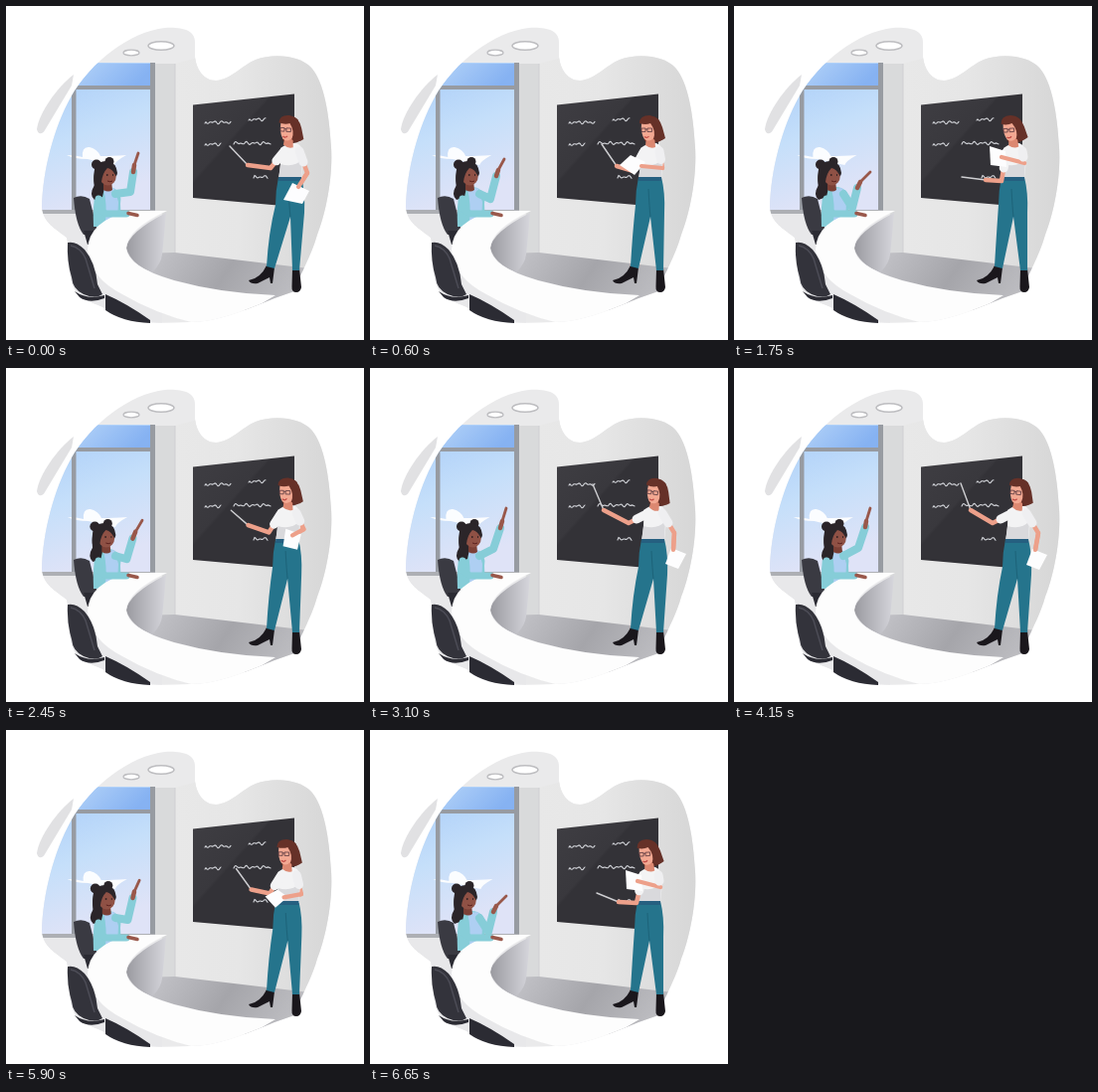
These frames come from a looping animation (360x336 px, 6.7 s). An HTML page:

```html
<!DOCTYPE html>
<html lang="en">
<head>
<meta charset="utf-8">
<title>Classroom</title>
<style>
html, body { margin: 0; width: 100%; height: 100%; overflow: hidden; background: #fff; }
svg { display: block; width: 360px; height: 336px; }
.limb { fill: none; stroke-linecap: round; stroke-linejoin: round; }
.chalk { fill: none; stroke: #d3d5da; stroke-width: 1.1; stroke-linecap: round; stroke-linejoin: round; }
</style>
</head>
<body>
<svg viewBox="0 0 360 336">
<defs>
  <linearGradient id="sky" x2=".3" y2="1"><stop stop-color="#a5caf8"/><stop offset=".55" stop-color="#c5dffa"/><stop offset="1" stop-color="#dfe3f7"/></linearGradient>
  <linearGradient id="pane" x2="1" y2=".3"><stop stop-color="#b2d2f8"/><stop offset="1" stop-color="#86b2f2"/></linearGradient>
  <linearGradient id="floor" x2="1" y2=".2"><stop stop-color="#c9c9ce"/><stop offset=".5" stop-color="#a5a5aa"/><stop offset="1" stop-color="#c4c4c8"/></linearGradient>
  <linearGradient id="wall" x2="1"><stop stop-color="#e8e8e8"/><stop offset=".4" stop-color="#e6e6e6"/><stop offset="1" stop-color="#d6d6d6"/></linearGradient>
  <linearGradient id="desk" x2="1"><stop stop-color="#9a9aa0"/><stop offset="1" stop-color="#d6d6dc"/></linearGradient>
  <linearGradient id="board" x2="1" y2="1"><stop stop-color="#3f3e43"/><stop offset=".38" stop-color="#39383d"/><stop offset=".4" stop-color="#333237"/><stop offset="1" stop-color="#333237"/></linearGradient>
  <clipPath id="clip"><path d="M190 36C190 24 176 21 160 22C124 26 86 56 65 92C48 123 37 165 36 202C37 218 50 224 61 233C65 250 61 272 70 287C79 298 94 300 103 306C127 321 156 319 184 318C216 318 244 304 270 294L290 287C296 268 307 252 313 230C321 210 329 174 327 142C325 108 320 77 307 62C296 50 270 47 251 54C237 60 226 74 211 75C199 75 191 64 190 50Z"/></clipPath>
</defs>

<path d="M68 69C51 82 33 108 31 124C32 129 36 130 39 125L66 80Z" fill="#e1e1e3"/>
<g clip-path="url(#clip)">
  <rect width="360" height="336" fill="#eaeaeb"/>
  <path d="M170 58L330 15V272L170 249Z" fill="url(#wall)"/>
  <path d="M150 58H170V249H150Z" fill="#d9dadb"/>
  <path d="M30 57H150V205H30Z" fill="url(#sky)"/>
  <path d="M70 58H145V80H70Z" fill="url(#pane)"/>
  <path id="cloud" d="M61 150Q70 150 77 152Q76 141 84 142Q92 144 95 151Q106 151 121 150Q110 156 109 160Q91 156 82 154Q69 154 61 150Z" fill="#fff" opacity=".93"/>
  <path d="M66 57H70.500V207H66ZM145 57H150V207H145ZM66 80H150V84H66Z" fill="#979ba2"/>
  <path d="M30 205H150V209H30Z" fill="#adafb4"/>
  <path d="M30 209H157V330H30Z" fill="#e8e8ea"/>
  <path d="M170 58V249" stroke="#cfcfd2"/>
  <ellipse cx="156" cy="40" rx="13" ry="4.300" fill="#fff" stroke="#bdbdc0" stroke-width="1.500"/>
  <ellipse cx="126" cy="47" rx="8" ry="2.800" fill="#fff" stroke="#bdbdc0" stroke-width="1.300"/>
  <path d="M130 249L170 248L330 267V300L180 310Z" fill="url(#floor)"/>
  <path d="M188 99.500L290 88.500V202L188 193Z" fill="url(#board)"/>
  <g id="chalk"></g>
</g>

<!-- student -->
<path d="M68 193Q76 189 84 194L91 222V230H78Q70 220 68 193Z" fill="#3a3a42"/>
<path d="M78 226H94V240H82Z" fill="#2b2b33"/>
<path d="M90 186Q99 180 108 183Q117 187 115 199L116 222H88Q87 201 90 186Z" fill="#86cdd8"/>
<path d="M98 184L109 183L113 197L112 218H100Q102 199 98 184Z" fill="#aecff2"/>
<g id="girl">
  <path d="M90 160Q87 172 89 180Q83 190 89 195L97 192L104 160Z" fill="#2b2529"/>
  <path d="M98 176H106L107 185Q103 188 98 185Z" fill="#7b4036"/>
  <ellipse cx="102.500" cy="171" rx="8.300" ry="9.500" fill="#8f5145"/>
  <circle cx="91" cy="159.500" r="5" fill="#2b2529"/>
  <circle cx="104" cy="156.500" r="4.500" fill="#2b2529"/>
  <path d="M89 167Q90 156 101 156Q111 157 112 168Q111 173 110 170Q107 164 102 163Q97 168 96 177L97 190L91 192Q87 178 89 167Z" fill="#2b2529"/>
  <path d="M101 170h1.500M107 170h1" stroke="#241a1d" stroke-width="1.500"/>
  <path d="M102 176q3 1.500 5 0" fill="none" stroke="#5c211e"/>
</g>
<path id="raise" class="limb" stroke="#86cdd8" stroke-width="8"/>
<path id="palm" class="limb" stroke="#99584b" stroke-width="4.500"/>
<path id="finger" class="limb" stroke="#99584b" stroke-width="2.800"/>

<!-- desk -->
<g clip-path="url(#clip)">
  <path d="M161 208L157 250Q156 259 147 268Q126 260 121 244Q122 228 161 208Z" fill="url(#desk)"/>
  <path d="M162 206H125Q83 216 82 245Q84 273 117 290Q151 310 190 319H225Q254 301 271 291Q216 289 169 276Q121 262 121 243Q123 224 162 206Z" fill="#fdfdfd"/>
</g>
<path class="limb" d="M93 194Q91 206 101 209L121 209" stroke="#86cdd8" stroke-width="7"/>
<path class="limb" d="M123 208.500L132 210.500" stroke="#99584b" stroke-width="3.500"/>

<!-- near chair -->
<path d="M62 238Q70 236 79 245Q90 258 92 280L97 290Q90 295 78 290Q67 285 66 273Q61 257 62 238Z" fill="#33333b"/>
<path d="M65 241Q75 243 80 254L89 284" fill="none" stroke="#4c4c56" stroke-width="1.500"/>
<path d="M69 287Q82 296 99 291V294Q84 300 74 293Z" fill="#2b2b33"/>
<path d="M100 290Q121 299 145 316V319Q117 318 100 306Z" fill="#2b2b33"/>

<!-- teacher -->
<path id="backArm" class="limb" stroke="#eda08a" stroke-width="4.500"/>
<path d="M262 261L270 263L268 279H266L265 273L253 279Q246 280 244 276Q256 274 262 261Z" fill="#1a171c"/>
<path d="M288 264H295L297 283Q296 288 292 288Q287 288 287.500 282Z" fill="#1a171c"/>
<path id="legs" fill="#25748c"/>
<path id="crease" fill="none" stroke="#1d6379" stroke-width="1"/>
<path id="torso" fill="#f3f3f4"/>
<path id="shade" fill="#d9d9dc"/>
<path id="belt" stroke="#255f80" stroke-width="4" fill="none"/>
<g id="head">
  <path d="M-6-11Q2-16 8-10Q11 0 14 8Q9 15 1 13L-6 12Z" fill="#5c2c25"/>
  <path d="M-4 7L4 6L5 18Q0 20-5 16Z" fill="#dc8871"/>
  <path d="M-9-6Q-4-12 3-8Q7 0 4 8Q-1 14-6 10Q-10 4-9-6Z" fill="#f2a892"/>
  <path d="M-11-6Q-11-14-1-14Q9-13 12-2L15 9Q9 14 3 10Q6 2 0-6Q-5-4-11-6Z" fill="#663128"/>
  <path d="M-9-1h4v3.500h-4zM-3-1h4.500v3.500h-4.500zM-5 0h2" fill="none" stroke="#5b3a40" stroke-width=".8"/>
  <path d="M-6 7.500q2.500 2 4.500-.5" fill="none" stroke="#c04a44" stroke-width="1.200"/>
</g>
<path id="stick" class="limb" stroke="#cfcfd2" stroke-width="1.400"/>
<path id="frontArm" class="limb" stroke="#eda08a" stroke-width="4.500"/>
<path id="frontSleeve" class="limb" stroke="#f3f3f4" stroke-width="9"/>
<path id="paper" fill="#fdfdfe"/>
<path id="foreArm" class="limb" stroke="#eda08a" stroke-width="4.200"/>
<path id="backSleeve" class="limb" stroke="#efeff1" stroke-width="9"/>
</svg>
<script>
const LOOP = 6700, CYCLE = 5500, STEP = 50;
const el = id => document.getElementById(id);
const set = (id, d) => el(id).setAttribute("d", d);
const mix = (a, b, k) => a + (b - a) * k;

// Every pose holds points as flat x,y pairs.
const point = {
  body: [286], head: [285, 124, 4], elbow: [266, 163], hand: [243, 160], tip: [225, 141],
  backElbow: [303, 168], backHand: [294, 182], paper: [288, 178, 305, 186, 298, 199, 279, 195],
  girl: [0], arm: [125, 187], wrist: [128, 167], fist: [129, 160], finger: [133, 148]
};
const lift = {
  body: [282], head: [282, 124, 0], elbow: [265, 166], hand: [248, 161], tip: [233, 139],
  backElbow: [294, 163], backHand: [273, 161], paper: [251, 160, 262, 150, 277, 157, 266, 170],
  girl: [-2], arm: [121, 194], wrist: [127, 171], fist: [129, 165], finger: [135, 154]
};
const read = {
  ...lift, body: [281], head: [280, 124, -4], elbow: [268, 174], hand: [250, 173], tip: [228, 164],
  backElbow: [292, 158], backHand: [269, 152], paper: [257, 141, 273, 146, 274, 162, 258, 160],
  girl: [-4], arm: [119, 203], wrist: [124, 183], fist: [127, 177], finger: [137, 167]
};
const tap = { ...read, elbow: [269, 176], hand: [253, 175], tip: [229, 172] };
const high = {
  ...point, body: [285], head: [288, 125, 8], elbow: [260, 156], hand: [235, 143], tip: [224, 117],
  backElbow: [306, 166], backHand: [305, 183], paper: [303, 181, 318, 187, 310, 202, 297, 197],
  girl: [1], arm: [124, 182], wrist: [131, 161], fist: [133, 154], finger: [137, 141]
};
const high2 = {
  ...high, head: [287, 125, 7], hand: [238, 143], tip: [228, 116], backHand: [303, 183],
  paper: [300, 182, 315, 188, 307, 203, 294, 198], girl: [2], arm: [125, 181], wrist: [132, 160]
};
const rest = { ...point, hand: [241, 160], tip: [222, 140] };
const keys = [[0, point], [600, lift], [1150, read], [1750, tap], [3100, high], [4150, high2], [5200, rest]];

// Cyclic access to the key poses.
function keyAt(i) {
  const n = keys.length, turn = Math.floor(i / n), [t, pose] = keys[i - turn * n];
  return { t: t + turn * CYCLE, pose };
}

// Flows through a key on the way, rests where the motion turns round.
function slope(before, after) {
  return before * after > 0 ? 2 * before * after / (before + after) : 0;
}

function poseAt(t) {
  const i = keys.filter(k => k[0] <= t).length - 1;
  const k = [-1, 0, 1, 2].map(j => keyAt(i + j));
  const span = k[2].t - k[1].t, u = (t - k[1].t) / span;
  const value = (name, j) => {
    const v = k.map(key => key.pose[name][j]);
    const d = [0, 1, 2].map(s => (v[s + 1] - v[s]) / (k[s + 1].t - k[s].t));
    const a = slope(d[0], d[1]) * span, b = slope(d[1], d[2]) * span;
    return mix(v[1], v[2], u * u * (3 - 2 * u)) + u * (1 - u) * ((1 - u) * a - u * b);
  };
  return Object.fromEntries(Object.keys(point).map(n => [n, point[n].map((_, j) => value(n, j))]));
}

const line = (...pts) => "M" + pts.map(p => p.join(" ")).join("L");
const part = (a, b, k) => [mix(a[0], b[0], k), mix(a[1], b[1], k)];

function draw(t) {
  const p = poseAt(t % CYCLE), x = p.body[0];
  const near = [x - 7, 147], far = [x + 9, 146];
  el("cloud").setAttribute("transform", `translate(${-p.girl[0] * .6} 0)`);
  el("girl").setAttribute("transform", `translate(${p.girl[0]} 0)`);
  set("raise", line([110, 189], p.arm, p.wrist));
  set("palm", line(p.wrist, p.fist));
  set("finger", line(p.fist, p.finger));

  set("legs", `M${x - 12} 172H${x + 11}Q${x + 15} 188 ${x + 14} 208L295 266H288L${x} 212L270 264L262 262Q264 228 ${x - 15} 200Q${x - 15} 186 ${x - 12} 172Z`);
  set("crease", `M${x - 2} 184Q${x - 1} 203 ${x} 212`);
  set("torso", `M${x - 10} 143Q${x - 2} 137 ${x + 6} 138Q${x + 14} 141 ${x + 13} 153L${x + 11} 174H${x - 12}Q${x - 9} 159 ${x - 10} 143Z`);
  set("shade", `M${x - 10} 159Q${x + 4} 163 ${x + 12} 154L${x + 11} 174H${x - 12}Z`);
  set("belt", `M${x - 12} 174H${x + 11}`);
  el("head").setAttribute("transform", `translate(${p.head[0]} ${p.head[1]}) rotate(${p.head[2]})`);
  set("backArm", line(far, p.backElbow, p.backHand));
  set("foreArm", line(p.backElbow, p.backHand));
  set("backSleeve", line(far, part(far, p.backElbow, .5)));
  set("frontArm", line(near, p.elbow, p.hand));
  set("frontSleeve", line(near, part(near, p.elbow, .55)));
  set("stick", line(p.hand, p.tip));
  const q = p.paper;
  set("paper", line(q.slice(0, 2), q.slice(2, 4), q.slice(4, 6), q.slice(6, 8)) + "Z");
}

// Chalk words: start x, baseline y, length.
for (const [x, y, w] of [[200, 117, 26], [244, 114, 17], [200, 139, 16], [229, 138, 37], [249, 172, 14]]) {
  let d = `M${x} ${y + 1}`;
  for (let i = 1; i <= w; i++) {
    const wave = Math.sin(i * .9 + x) * 1.7 * Math.cos(i * .23);
    d += `L${x + i} ${(y + wave).toFixed(1)}`;
  }
  el("chalk").insertAdjacentHTML("beforeend", `<path class="chalk" d="${d}"/>`);
}

const start = performance.now();
function tick(now) {
  const t = Math.max(0, now - start) % LOOP;
  draw(Math.floor(t / STEP) * STEP);
  requestAnimationFrame(tick);
}
draw(0);
requestAnimationFrame(tick);
</script>
</body>
</html>
```
